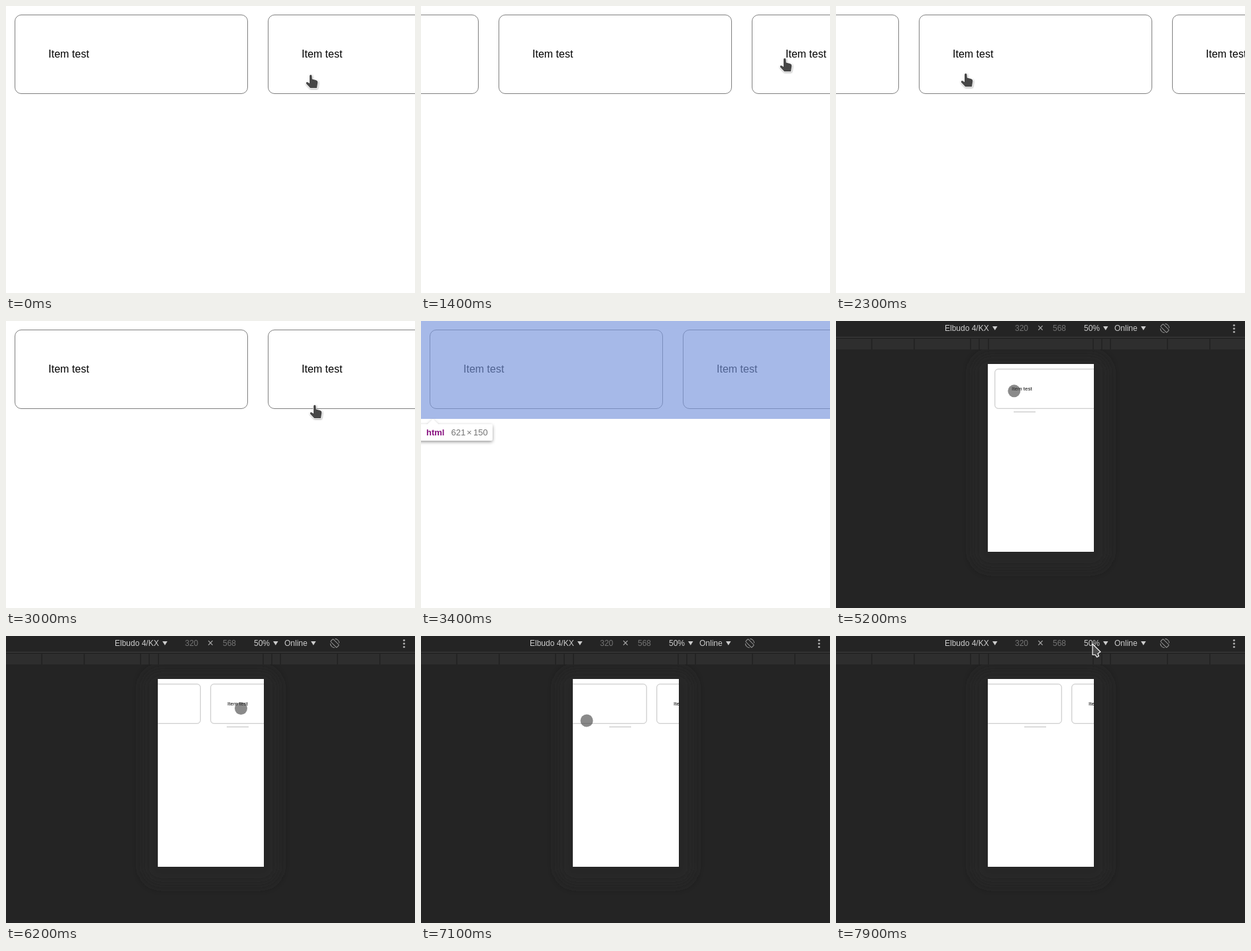
Write an HTML page that moves like this. It is 617 by 434 pixels and loops after 8 s.

```html
<!DOCTYPE html>
<html lang="en">
<head>
<meta charset="utf-8">
<title>Drag scroll list</title>
<style>
  html, body { margin: 0; width: 100%; height: 100%; overflow: hidden; background: #fff; }
  svg { display: block; width: 617px; height: 434px; }
  text { font-family: "Liberation Sans", Arial, sans-serif; white-space: pre; }
  .bar { font-size: 12px; fill: #ccc; }
  .tip { font-size: 13px; fill: #737373; }
</style>
</head>
<body>
<svg viewBox="0 0 617 434">
  <defs>
    <clipPath id="screen"><rect x="229" y="65" width="160" height="284"/></clipPath>
    <filter id="glow" x="-30%" y="-30%" width="160%" height="160%"><feGaussianBlur stdDeviation="8"/></filter>
    <filter id="drop" x="-30%" y="-30%" width="160%" height="180%">
      <feDropShadow dx="0" dy="2" stdDeviation="2.5" flood-color="#000" flood-opacity=".4"/>
    </filter>
    <filter id="soft" x="-30%" y="-30%" width="160%" height="170%">
      <feDropShadow dx="0.5" dy="1" stdDeviation="1" flood-color="#000" flood-opacity=".4"/>
    </filter>
  </defs>
  <rect width="617" height="434" fill="#fff"/>

  <g id="device">
    <rect width="617" height="434" fill="#242424"/>
    <rect x="206" y="50" width="206" height="326" rx="26" fill="#262626" filter="url(#glow)"/>
    <rect y="24" width="617" height="1" fill="#3d3d3d"/>
    <rect y="27" width="617" height="16" fill="#2e2e2e"/>
    <g id="ticks" fill="#242424"></g>
    <g class="bar">
      <text x="164" y="15">Elbudo 4/KX</text>
      <text x="270" y="15" fill="#747474">320</text>
      <text x="308.5" y="16" font-size="16" text-anchor="middle" fill="#aaa">×</text>
      <text x="327" y="15" fill="#747474">568</text>
      <text x="374" y="15">50%</text>
      <text x="420" y="15">Online</text>
      <path d="M236 8h7.500l-3.750 6zM403 8h7.500l-3.750 6zM460 8h7.500l-3.750 6z"/>
    </g>
    <g transform="translate(496 11) rotate(45)" fill="none" stroke="#999">
      <rect x="-6.500" y="-2.700" width="13" height="5.400" rx="1"/>
      <path d="M-4.500-5A6.700 6.700 0 0 1 4.500-5M4.500 5A6.700 6.700 0 0 1-4.500 5"/>
    </g>
    <g id="dots" fill="#aaa"></g>
    <rect x="229" y="65" width="160" height="284" fill="#fff"/>
  </g>

  <g id="view"><g id="page"></g></g>
  <rect id="thumb" y="137" width="33" height="1" fill="#bdbdbd"/>

  <g id="inspect">
    <rect width="617" height="148" fill="#7995dd" opacity=".66"/>
    <path d="M-4 156H10L18 148.500L26 156H105Q108 156 108 159V178Q108 181 105 181H-4Z" fill="#fff" filter="url(#drop)"/>
    <g class="tip">
      <text x="8" y="173" font-weight="bold" fill="#881280">html</text>
      <text x="45.500" y="173">621</text>
      <text x="69" y="173">×</text>
      <text x="79" y="173">150</text>
    </g>
  </g>

  <path id="hand" d="M-2 1.500Q-1.800 0 -.3 0Q1.300 0 1.400 1.500L1.800 6.500L8 8.300Q10.500 9 10.300 11.500L9 20H-1L-7.300 13.200Q-7.500 10.600 -5 11.200L-2 13Z"
    fill="#474747" stroke="#fff" stroke-width="1.600" paint-order="stroke" filter="url(#soft)"/>
  <circle id="touch" r="9.500" fill="#3c3c3c" fill-opacity=".6"/>
  <path id="arrow" d="M0 0V16.500H4.300L6.500 20L9.500 18.500L8 14.500L12 12Z" fill="#4c4c4c" stroke="#fff" stroke-width="1.200" stroke-linejoin="round"/>
</svg>
<script>
const LOOP = 8, PITCH = 382;
const el = id => document.getElementById(id);
const show = (id, on) => el(id).setAttribute("display", on ? "inline" : "none");
const move = (id, x, y, extra = "") => el(id).setAttribute("transform", `translate(${x} ${y}) ${extra}`);
const repeat = (id, list, markup) => { el(id).innerHTML = list.map(markup).join(""); };

repeat("page", [0, 1, 2, 3], i => `<g transform="translate(${15 + i * PITCH} 15)">
  <rect x=".5" y=".5" width="351" height="119" rx="9.5" fill="none" stroke="#808080"/>
  <text x="51" y="65" font-size="16">Item test</text></g>`);
// Ruler marks sit at common screen widths, mirrored about the centre
repeat("ticks", [320, 375, 425, 768, 1024], w => [309 - w / 4, 307 + w / 4]
  .map(x => `<rect x="${Math.floor(x)}" y="26" width="2" height="17"/>`).join(""));
repeat("dots", [0, 1, 2], i => `<circle cx="600.5" cy="${6.5 + 5 * i}" r="1.6"/>`);

// One eased leg of a movement: start and end in seconds, then where it arrives
const leg = (from, to, x, y, held = false) => ({ from, to, x, y, held });
const drag = (...place) => leg(...place, true);

const mouse = [
  leg(0, .3, 496, 104), drag(.5, .8, 59, 106),
  leg(.9, 1.1, 390, 100), drag(1.1, 1.4, 549, 79),
  leg(1.4, 1.6, 271, 96), drag(1.6, 1.85, 549, 126),
  leg(1.9, 2, 466, 104), drag(2.1, 2.3, 196, 102), drag(2.3, 3, 466, 127)
];
const finger = [
  leg(4.3, 4.8, 370, 105), leg(4.9, 5.3, 250, 106), leg(5.3, 5.4, 370, 106),
  leg(5.4, 5.8, 244, 107), leg(5.9, 6.2, 354.5, 109.5), leg(6.2, 6.7, 375, 108),
  leg(6.9, 7.1, 250, 128), leg(7.1, 7.4, 424, 24), leg(7.4, 7.7, 345.5, 123.5),
  leg(7.8, 7.9, 387, 12)
];
// Swipes on the phone coast on after the finger, so x is the scroll itself
const swipes = [leg(4.9, 5.4, 290, 0), leg(5.4, 5.8, 611, 0), leg(5.9, 6.7, 263, 0)];

const smooth = u => u * u * (3 - 2 * u);

function follow(legs, x, y, t) {
  let dragged = 0;
  for (const l of legs) {
    const u = smooth(Math.min(1, Math.max(0, (t - l.from) / (l.to - l.from))));
    const dx = (l.x - x) * u;
    if (l.held) dragged += dx;
    x += dx;
    y += (l.y - y) * u;
    if (u < 1) break;
  }
  return { x, y, dragged };
}

function draw(seconds) {
  const t = Math.floor((seconds % LOOP) * 10) / 10;
  const phone = t >= 4, zoomed = t >= 4.3;
  const hand = follow(mouse, 460, 104, t);
  const touch = follow(finger, 380, 130, t);
  const scroll = Math.round(phone ? follow(swipes, 0, 0, t).x : -hand.dragged);

  show("device", phone);
  if (phone) el("view").setAttribute("clip-path", "url(#screen)");
  else el("view").removeAttribute("clip-path");
  if (phone) move("page", 229 - scroll, 65, zoomed ? "scale(.5)" : "");
  else move("page", -2 - scroll, -2);

  show("thumb", t >= 5);
  el("thumb").setAttribute("x", Math.round(229 + scroll * 0.2076));
  show("inspect", t >= 3.2 && t < 3.5);

  // Over the phone screen the pointer is a touch spot, elsewhere an arrow
  const inside = touch.x > 229 && touch.x < 389 && touch.y > 65;
  show("hand", t <= 3);
  move("hand", hand.x, hand.y);
  show("touch", zoomed && inside);
  move("touch", touch.x, touch.y);
  show("arrow", zoomed && !inside);
  move("arrow", touch.x, touch.y);
}

const start = performance.now();
function tick() {
  draw((performance.now() - start) / 1000);
  requestAnimationFrame(tick);
}
tick();
</script>
</body>
</html>
```
